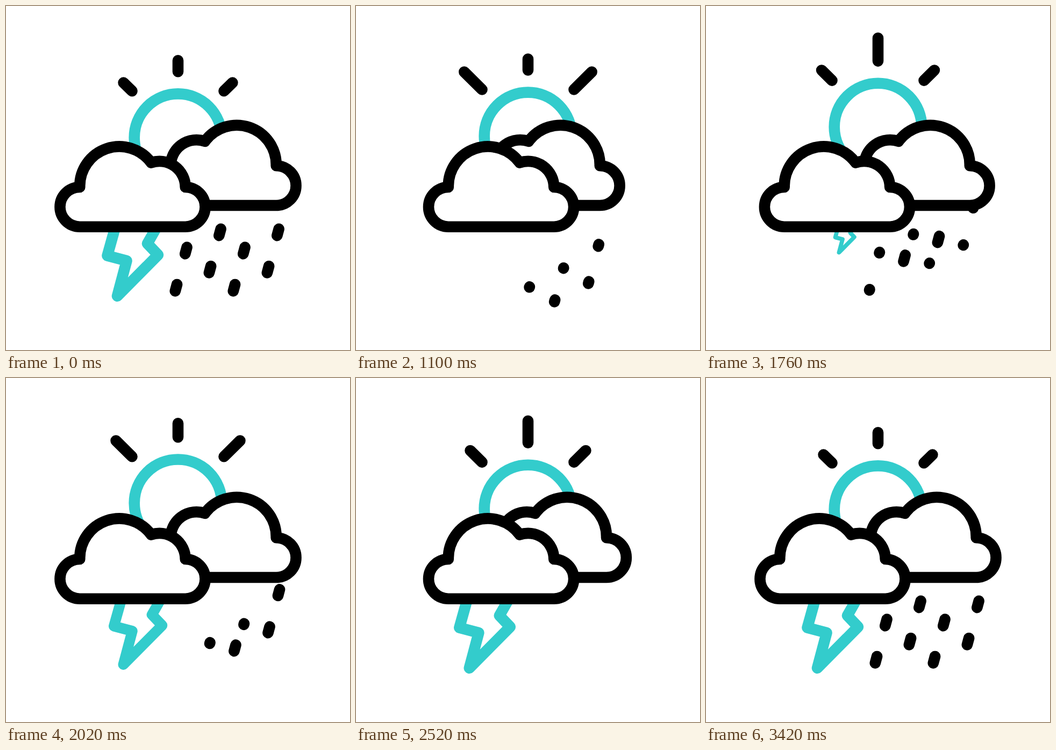
An HTML page that plays this animation: 640x640 px, repeating every 3.6 s.

```html
<!DOCTYPE html>
<html lang="en">
<head>
<meta charset="utf-8">
<title>Stormy weather</title>
<style>
  html, body { margin: 0; width: 100%; height: 100%; overflow: hidden; background: #fff; }
  svg { display: block; width: 100vw; height: 100vh; }
  svg > * { fill: none; stroke: #000; stroke-width: 20.6; stroke-linecap: round; stroke-linejoin: round; }
  .teal { stroke: #3cc; }
  svg > .cloud { fill: #fff; }
</style>
</head>
<body>
<svg viewBox="0 0 640 640">
  <defs>
    <path id="cloud" d="M137.3 337A73.5 73.5 0 0 1 270 291.5A48 48 0 0 1 333.7 337A36.8 36.8 0 0 1 333.7 410.7H137.3A36.8 36.8 0 0 1 137.3 337Z"/>
  </defs>
  <g id="sun">
    <circle class="teal" cx="320" cy="244.7" r="81.3"/>
    <path id="rays"/>
  </g>
  <path id="rain"/>
  <g id="back" class="cloud"><use href="#cloud" transform="translate(640 -39.7) scale(-1 1)"/></g>
  <path id="bolt" class="teal" d="M206.5 400L188.5 464.5L224.5 474L207 539.7L283 463L263 442L287 400"/>
  <g id="front" class="cloud"><use href="#cloud"/></g>
</svg>
<script>
const LOOP = 3600, START = 420, ACTIVE = 3000;
const SLANT = 0.267, DROP = 12.4;

const $ = id => document.getElementById(id);
const move = (id, x, y) => $(id).setAttribute('transform', `translate(${x} ${y})`);
const unit = (t, from, to) => Math.min(1, Math.max(0, (t - from) / (to - from)));

function ease(t, from, to) {
  const p = unit(t, from, to);
  return p * p * (3 - 2 * p);
}

// Rises from 0 to 1 at the peak, then returns to 0.
const hump = (t, from, peak, to) => ease(t, from, peak) - ease(t, peak, to);

// Four slanted lines of two drops; each drop exits, falls once more, then returns.
function dropPath(n, t) {
  const line = n >> 1, rank = Math.floor(n * 0.4);
  const y = 455 - 34 * (line % 2) + 69.2 * (n % 2);
  const x = 456.4 + 54 * line - SLANT * y;

  const exit = unit(t, 0, 480 + 250 * rank);
  const fallStart = 785 + 270 * rank;
  const fall = unit(t, fallStart, fallStart + 591);
  const backStart = 2206 + 200 * Math.min(line, 2);
  const back = unit(t, backStart, backStart + 350);

  let dy, drift, size;
  if (back > 0) [dy, drift, size] = [35 * (back - 1), 0.2, back];
  else if (fall > 0) [dy, drift, size] = [54 * fall - 47, -0.07, 1 - Math.abs(2 * fall - 1)];
  else [dy, drift, size] = [35 * exit, -0.24, 1 - exit];
  if (size <= 0) return '';

  const h = DROP * size / 2, w = SLANT * h;
  const cx = x + drift * dy, cy = y + dy;
  return `M${cx + w} ${cy - h}L${cx - w} ${cy + h}`;
}

function drawRays(t) {
  const top = 34 * (hump(t, 680, 1070, 1750) + hump(t, 1500, 2580, 3000));
  const side = 17.5 * hump(t, 0, 640, 1220) + 15.5 * hump(t, 1180, 1700, 2400)
    - 5.5 * hump(t, 2100, 2500, 3000);
  const sideRay = dir =>
    `M${320 + 85.5 * dir} 158.2L${320 + (101.4 + side) * dir} ${142.6 - side}`;
  $('rays').setAttribute('d', `M320 122.2V${101.2 - top}` + sideRay(-1) + sideRay(1));
}

function drawBolt(t) {
  const x = 36 * (hump(t, 0, 880, 1980) + hump(t, 2000, 2500, 3000));
  const size = 1 - ease(t, 0, 560) + ease(t, 1100, 1680) - ease(t, 2150, 2480) + ease(t, 2560, 3000);
  $('bolt').style.visibility = size > 0.01 ? 'visible' : 'hidden';
  $('bolt').setAttribute('transform',
    `translate(${236 + x} 410) scale(${size}) translate(-236 -410)`);
}

function draw(now) {
  const t = Math.min(ACTIVE, Math.max(0, now % LOOP - START));
  const sway = secondPeak => hump(t, 0, 775, 1600) + hump(t, 1600, secondPeak, 3000);
  const back = -51 * sway(2370);

  move('front', 36 * sway(2170), 0);
  move('back', back, 0);
  move('rain', back, 0);
  move('sun', 0, -20 * (hump(t, 500, 1280, 2020) + hump(t, 2020, 2490, 3000)));

  let rain = '';
  for (let n = 0; n < 8; n++) rain += dropPath(n, t);
  $('rain').setAttribute('d', rain);

  drawRays(t);
  drawBolt(t);
}

const begin = performance.now();
function tick() {
  draw(performance.now() - begin);
  requestAnimationFrame(tick);
}
tick();
</script>
</body>
</html>
```
